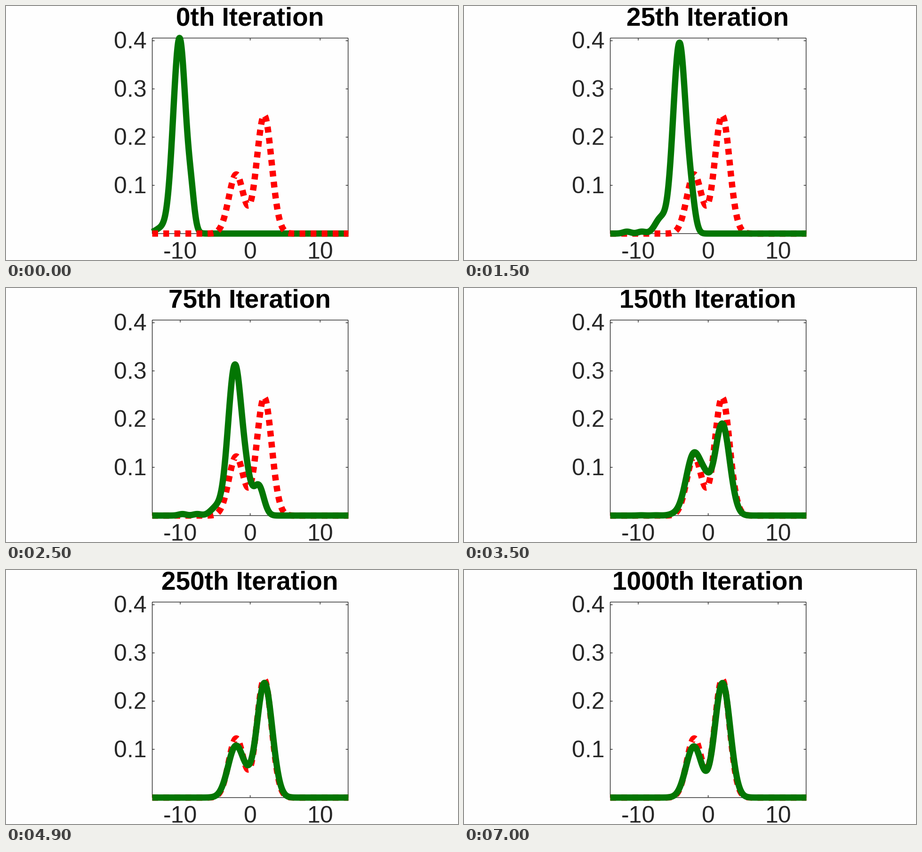
A matplotlib script that plays this animation: 960 by 540 pixels, repeating every 7100 ms.

```python
import numpy as np
import matplotlib.pyplot as plt
from matplotlib.animation import FuncAnimation

W, H, DPI = 960, 540, 100
FRAMES, INTERVAL = 71, 100
PT = 72 / DPI  # points per pixel

LEFT, RIGHT, TOP, BASE = 310.6, 726.6, 68.2, 483.8
X0, UNIT_X, UNIT_Y = (LEFT + RIGHT) / 2, (RIGHT - LEFT) / 28, 1025
INK, GREEN, RED, PAPER = "#262626", "#037603", "#ff0000", "#fefefe"
LINE = 13.4

plt.rcParams["font.family"] = "Liberation Sans"
plt.rcParams["path.simplify"] = False

xs = np.linspace(-14, 14.05, 700)


def bell(height, centre, spread):
    return height * np.exp(-((xs - centre) / spread) ** 2 / 2)


def px(x):
    return X0 + UNIT_X * np.asarray(x)


def py(y):
    return BASE - UNIT_Y * np.asarray(y)


def iteration(frame):
    """The counter runs at a steady rate between a few milestones."""
    value = np.interp(frame, [0, 5, 15, 30, 40, 49, 60, 70],
                      [0, 5, 25, 100, 200, 250, 500, 1000])
    step = 5 if value > 25 else 1
    return int(round(value / step)) * step


def density(t):
    """Particles drift right, settle on the left mode, then split."""
    split = 1 / (1 + np.exp((91.5 - t) / 22.7))
    centre = -2.05 - 8.05 * np.exp(-t / 18.3)
    main = bell(.411 - .305 * split, centre, .9 + .22 * split)

    grown = np.exp(-(84.7 / (t + .1)) ** 2.5)
    overshoot = .015 * np.exp(-((t - 250) / 80) ** 2)
    right = bell(.238 * grown + overshoot,
                 2.05 - 17 * np.exp(-t / 25), .55 + .55 * split)

    lead = bell(.047 * np.exp(-(t / 230) ** 4), centre + 1.7,
                .45 + .5 * t / (t + 100))
    trail = bell((.01 + .0024 * t) * np.exp(-t / 30), centre - 2.7, .8)
    stragglers = sum(bell(.004 * np.exp(-(t / 120) ** 3), centre - lag, .55)
                     for lag in (5.4, 7.5))
    return main + right + lead + trail + stragglers


fig = plt.figure(figsize=(W / DPI, H / DPI), dpi=DPI, facecolor=PAPER)
ax = fig.add_axes([0, 0, 1, 1])
ax.set_xlim(0, W)
ax.set_ylim(H, 0)
ax.axis("off")


def stroke(x, y):
    ax.plot(x, y, color=INK, lw=1.4 * PT, solid_capstyle="butt",
            solid_joinstyle="miter", snap=False, zorder=1)


def label(x, y, text, size, **style):
    return ax.text(x, y, text, fontsize=size * PT, va="baseline", **style)


stroke([LEFT, RIGHT, RIGHT, LEFT, LEFT], [TOP, TOP, BASE, BASE, TOP])
for value in (-10, 0, 10):
    x = px(value)
    stroke([x, x], [TOP, TOP + 5])
    stroke([x, x], [BASE, BASE - 5])
    label(x, 537, str(value), 50, ha="center", color=INK)
for value in (.1, .2, .3, .4):
    y = py(value)
    stroke([LEFT, LEFT + 5], [y, y])
    stroke([RIGHT, RIGHT - 5], [y, y])
    label(298.5, y + 16.5, f"{value:.1f}", 50, ha="right", color=INK)

title = label(X0 - .8, 41, "", 55, ha="center", color="black", weight="bold")

goal = bell(.1225, -2, 1.065) + bell(.245, 2, 1.065)
ax.plot(px(xs), py(goal), color=RED, lw=LINE * PT, zorder=3,
        linestyle=(0, (12.3 / LINE, 11.2 / LINE)),
        dash_capstyle="butt", dash_joinstyle="round")
curve, = ax.plot([], [], color=GREEN, lw=LINE * PT,
                 solid_capstyle="butt", solid_joinstyle="round")


def draw(frame):
    it = iteration(frame)
    title.set_text(f"{it}th Iteration")
    curve.set_data(px(xs), py(density(it)))
    curve.set_zorder(4 if frame else 2)  # starts out behind the dashes
    return title, curve


anim = FuncAnimation(fig, draw, frames=FRAMES, interval=INTERVAL,
                     repeat=True, repeat_delay=0)
plt.show()
```
